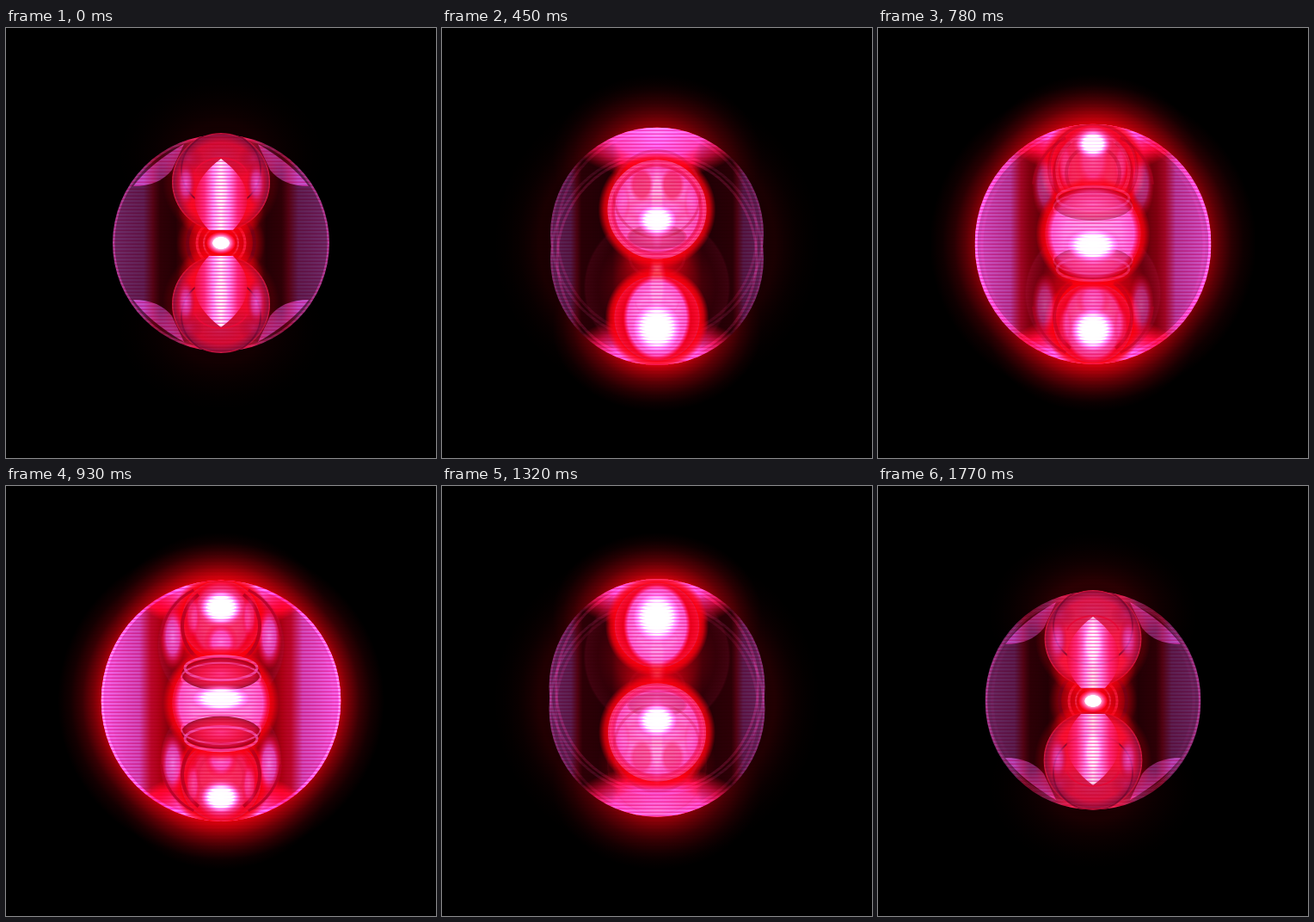
An HTML page with a canvas for the animation above (1800 ms loop, 500x500 px).

```html
<!DOCTYPE html>
<html lang="en">
<head>
<meta charset="utf-8">
<title>Glowing orbs</title>
<style>
html, body { margin: 0; width: 100%; height: 100%; overflow: hidden; background: #000; }
canvas { display: block; width: 500px; height: 500px; }
</style>
</head>
<body>
<canvas id="stage" width="500" height="500"></canvas>
<script>
const LOOP = 1800, STEP = 30;
const ctx = document.getElementById('stage').getContext('2d');

// Piecewise linear curve through the given points
function curve(xs, ys) {
  return x => {
    if (x <= xs[0]) return ys[0];
    for (let i = 1; i < xs.length; i++) {
      if (x <= xs[i]) return ys[i - 1] + (ys[i] - ys[i - 1]) * (x - xs[i - 1]) / (xs[i] - xs[i - 1]);
    }
    return ys[ys.length - 1];
  };
}

// Curves over time; the upper half uses the reversed time
const TIMES = [0, 240, 330, 660, 900, 1140, 1470, 1560, 1800];
const overTime = (...ys) => curve(TIMES, ys);
const shellRadius = overTime(126, 120, 118, 134.5, 140, 134.5, 118, 120, 126);
const shellShift = overTime(0, 17, 24, 7, 0, 2, 15, 10, 0);
const edgeLight = overTime(.42, .26, .22, .62, 1, .62, .22, .26, .42);
const edgeWidth = overTime(.22, .13, .11, .21, .25, .21, .11, .13, .22);
const sideGlow = overTime(0, 0, 0, .3, .85, .3, 0, 0, 0);
const poleGlow = overTime(.08, .85, 1, .9, .8, .7, .4, .3, .08);
const poleLight = overTime(.2, .95, 1, 1, .9, 1, .95, .9, .2);

// Curves over the orb's angle from the front, in degrees
const ANGLES = [0, 12, 30, 45, 57, 78, 90, 102, 112];
const overAngle = (...ys) => curve(ANGLES, ys);
const orb = {
  y: overAngle(0, 22, 51, 71, 84, 91, 95, 80, 74),
  r: overAngle(57, 54, 60, 57, 52, 47, 45, 57, 58),
  pink: overAngle(.85, 1, .65, .08, 1, .8, .3, .3, 0),
  coreY: overAngle(-3, -24, -4, -10, 22, 0, 16, 40, 34),
  coreW: overAngle(40, 30, 24, 12, 33, 31, 28, 18, 10),
  coreH: overAngle(16, 30, 16, 36, 31, 38, 22, 18, 10),
  core: overAngle(.9, 1, .9, .3, 1, .95, 1, .7, 0),
  alpha: overAngle(1, 1, 1, 1, 1, 1, 1, .9, 0),
  haloR: overAngle(60, 60, 60, 65, 84, 87, 73, 60, 58),
  halo: overAngle(0, 0, 0, 0, .08, .55, .75, .4, 0)
};
const near = (x, mid, span) => Math.max(0, 1 - Math.abs(x - mid) / span);
const nearStart = t => near(t, 0, 230) + near(t, LOOP, 230);
const rgba = (r, g, b, a = 1) => `rgba(${r},${g},${b},${a})`;
const red = a => rgba(255, 0, 16, a);

const GLOW_FADE = [[0, red(1)], [.4, red(.95)], [.52, red(.62)], [.65, red(.35)], [.8, red(.14)], [.9, red(.05)], [1, red(0)]];
const AURA_FADE = [[0, red(1)], [.72, red(.95)], [.78, red(.6)], [.85, red(.28)], [.92, red(.1)], [1, red(0)]];
const RED_FADE = [[0, red(1)], [.5, red(.75)], [.75, red(.35)], [1, red(0)]];
const PINK_FADE = [[0, rgba(255, 150, 255)], [.5, rgba(255, 100, 235, .85)], [.75, rgba(255, 20, 100, .6)], [1, rgba(255, 0, 30, 0)]];
const WHITE_FADE = [[0, '#fff'], [.5, rgba(255, 250, 255, .95)], [.75, rgba(255, 150, 255, .5)], [1, rgba(255, 80, 220, 0)]];

function blob(x, y, rx, ry, alpha, stops) {
  if (alpha <= 0) return;
  ctx.save();
  ctx.globalAlpha *= Math.min(1, alpha);
  ctx.translate(x, y);
  ctx.scale(rx, ry);
  const g = ctx.createRadialGradient(0, 0, 0, 0, 0, 1);
  stops.forEach(([p, c]) => g.addColorStop(p, c));
  ctx.fillStyle = g;
  ctx.beginPath();
  ctx.arc(0, 0, 1, 0, 7);
  ctx.fill();
  ctx.restore();
}

function ring(x, y, rx, ry, width, color, alpha = 1, from = 0, to = Math.PI * 2) {
  if (alpha <= 0) return;
  ctx.save();
  ctx.globalAlpha *= alpha;
  ctx.strokeStyle = color;
  ctx.lineWidth = width;
  ctx.beginPath();
  ctx.ellipse(x, y, rx, ry, 0, from, to);
  ctx.stroke();
  ctx.restore();
}

function bothSides(draw) {
  for (const side of [-1, 1]) {
    ctx.save();
    ctx.scale(side, 1);
    draw();
    ctx.restore();
  }
}

// Runs draw for the lower half, then mirrored for the upper half
function bothHalves(t, draw) {
  for (const side of [1, -1]) {
    ctx.save();
    ctx.scale(1, side);
    draw(side > 0 ? t : LOOP - t);
    ctx.restore();
  }
}

function glow(t) {
  blob(0, 0, 190, 184, sideGlow(t), AURA_FADE);
  bothHalves(t, h => blob(0, 100, 122, 96, poleGlow(h), GLOW_FADE));
}

function shellPath(t) {
  const w = shellRadius(t);
  ctx.beginPath();
  for (const y of [shellShift(t), -shellShift(LOOP - t)]) {
    ctx.moveTo(w, y);
    ctx.arc(0, y, w, 0, 7);
  }
}

function shell(t) {
  const w = shellRadius(t), e = edgeLight(t), band = edgeWidth(t), start = nearStart(t);
  ctx.save();
  shellPath(t);
  ctx.clip();
  ctx.fillStyle = '#050002';
  ctx.fillRect(-150, -150, 300, 300);
  ctx.globalCompositeOperation = 'lighter';

  const g = ctx.createLinearGradient(-w, 0, w, 0);
  const stops = [
    [0, rgba(255, 110, 245, e)],
    [band * .65, rgba(255, 90, 225, e * .85)],
    [band * .85, rgba(255, 10, 60, e * .75)],
    [band, rgba(215, 0, 25, .06 + e * e * .8)],
    [.29, rgba(170, 0, 14, .06 + e * e * .75)],
    [.36, rgba(220, 0, 14, .3 + e * .4)],
    [.5, '#e0001c']
  ];
  stops.forEach(([p, c]) => {
    g.addColorStop(p, c);
    g.addColorStop(1 - p, c);
  });
  ctx.fillStyle = g;
  ctx.fillRect(-150, -150, 300, 300);

  bothHalves(t, h => {
    const y = shellShift(h), apart = Math.min(1, y / 15);
    blob(0, y + w - 8, 104, 52, poleLight(h), PINK_FADE);
    ring(0, y, w - 1, w - 1, 3, '#d04ca8', e * .35);
    ring(0, y, w - 8, w - 5, 3, '#b03078', apart * .22);
    bothSides(() => {
      ctx.globalAlpha = start * .5;
      ctx.fillStyle = '#c45be0';
      ctx.beginPath();
      ctx.moveTo(102, 66);
      ctx.quadraticCurveTo(83, 92, 43, 115);
      ctx.lineTo(57, 85);
      ctx.quadraticCurveTo(72, 66, 102, 66);
      ctx.fill();
    });
  });
  ctx.restore();
}

function centre(t) {
  const start = nearStart(t);
  blob(0, 0, 52, 46, .9 * start, RED_FADE);
  ring(0, 0, 39, 38, 4, '#70001c', start * .7);
  ring(0, 0, 28, 27, 3, '#ff2348', start * .8);
  ring(0, 0, 20, 19, 2, '#ff588c', start * .5);
  bothHalves(t, h => {
    const neck = near(h, 285, 240);
    blob(0, 13, 42, 36, neck, RED_FADE);
    ring(0, 16, 32, 24, 3, '#d51d4b', neck * .6);
    blob(0, 14, 9, 32, neck, WHITE_FADE);
  });
}

function spindle(alpha) {
  if (alpha <= 0) return;
  ctx.save();
  ctx.globalAlpha *= alpha;
  const g = ctx.createLinearGradient(-32, 0, 32, 0);
  [[0, '#f00a30'], [.2, '#ff2f88'], [.36, '#ff9cff'], [.5, '#fff'], [.64, '#ff9cff'], [.8, '#ff2f88'], [1, '#f00a30']].forEach(s => g.addColorStop(...s));
  ctx.fillStyle = g;
  ctx.beginPath();
  ctx.moveTo(-14, 15);
  ctx.bezierCurveTo(-38, 40, -38, 70, 0, 98);
  ctx.bezierCurveTo(38, 70, 38, 40, 14, 15);
  ctx.fill();
  ctx.restore();
}

// Details that show only around certain angles; y is the orb's centre
function details(s, y, r) {
  const front = near(s, 0, 11), face = near(s, 30, 13), lens = near(s, 45, 12);
  const stem = near(s, 58, 13), side = near(s, 90, 13), back = near(s, 104, 14);

  for (const k of [-1, 1]) {
    blob(0, y + k * 34, 46, 19, front * .95, [[0, '#ff2a78'], [.5, '#f00830'], [.85, '#c40020'], [1, '#8d0018']]);
    ring(0, y + k * 30, 46, 17, 2, '#ff68c0', front * .7);
    ring(0, y + k * 41, 42, 14, 3, '#ff78e0', front * .7);
  }

  ring(0, y + 18, r - 7, r - 7, 3, '#d01848', face * .8);
  ring(0, y, r - 2, r - 2, 4, '#ff84e0', face);
  ring(0, y, r - 7, r - 7, 3, '#e0002c', face);
  blob(0, y - 32, 35, 15, face * .9, [[0, '#f0246a'], [.7, '#b00020'], [.9, '#a00020'], [1, '#ff2a62']]);
  blob(0, y, 46, 17, face * .8, PINK_FADE);
  bothSides(() => {
    blob(18, y + 29, 14, 20, face, [[0, '#e00018'], [.7, '#f00028'], [1, rgba(255, 0, 50, 0)]]);
    blob(40, y + 8, 9, 24, face * .6, PINK_FADE);
  });
  blob(0, y + 6, 10, 58, face * .85, WHITE_FADE);

  ring(0, y + 14, 46, 44, 2, '#6e0830', lens * .8);
  bothSides(() => {
    blob(41, y - 2, 11, 27, lens * .85, [[0, '#e870ee'], [.5, '#d43a9c'], [1, rgba(190, 0, 50, 0)]]);
    blob(38, y + 27, 18, 17, lens * .55, [[0, '#a92a7e'], [1, rgba(120, 0, 40, 0)]]);
  });
  spindle(lens);
  ring(0, 77, 31, 22, 2, '#e90c3c', lens, .25, Math.PI - .25);

  blob(0, y - r + 14, 12, 40, stem, WHITE_FADE);
  ring(0, y - 19, 25, 17, 2, '#ff3f9a', stem * .5, 0, Math.PI);

  bothSides(() => {
    blob(56, y - 20, 15, 38, side, PINK_FADE);
    ring(0, y - 26, 70, 68, 3, '#b50028', side * .9, .1, 1.1);
    ring(0, y - 8, 45, 46, 4, '#b20022', side * .9, -1, .95);
    blob(33, y + 4, 9, 28, side * .5, PINK_FADE);
  });
  blob(0, y - 26, 20, 24, side * .9, PINK_FADE);

  for (const k of [0, 9, 20]) ring(0, y - k * .3, r - k, r - k, 4, k === 9 ? '#ff5a9f' : '#a90022', back * .8);
  blob(0, y + 10, 22, 38, back * .9, PINK_FADE);
}

function drawOrb(angle) {
  const s = Math.abs(angle);
  const alpha = orb.alpha(s);
  if (alpha <= 0) return;
  const y = orb.y(s), r = orb.r(s), hr = orb.haloR(s);
  const lens = near(s, 45, 16);
  ctx.save();
  ctx.scale(1, angle < 0 ? -1 : 1);
  ctx.globalAlpha = alpha;

  blob(0, y - (hr - r), hr, hr, orb.halo(s), [[0, '#f00018'], [.55, rgba(225, 0, 25, .75)], [.8, rgba(130, 0, 28, .45)], [.97, rgba(165, 20, 65, .5)], [1, rgba(120, 0, 40, 0)]]);

  // Red rim, then the pink body
  blob(0, y, r + 11, r + 11, 1 - lens * .85, [[0, red(1)], [.82, red(.95)], [.9, red(.7)], [1, red(0)]]);
  blob(0, y, r, r, 1, [[0, '#fa0024'], [.8, '#ec0020'], [.96, lens > .3 ? '#8d1440' : '#f80c30'], [1, '#e81c48']]);
  blob(0, y - 32, 50, 38, lens * .9, [[0, '#ff1030'], [.6, red(.85)], [1, red(0)]]);
  blob(0, y + 30, r - 6, 30, lens * .5, [[0, '#a22465'], [1, rgba(90, 0, 35, 0)]]);
  const bodyW = s > 66 ? r * .8 : r;
  blob(0, y, bodyW, r, orb.pink(s), [[0, '#ffc4ff'], [.6, '#ffa0ff'], [.86, '#ff70e8'], [.94, rgba(255, 35, 115, .9)], [1, rgba(255, 0, 30, .2)]]);
  details(s, y, r);
  blob(0, y + orb.coreY(s), orb.coreW(s), orb.coreH(s), orb.core(s), WHITE_FADE);
  ctx.restore();
}

// Keeps the orbs and their rims inside the shell
function orbs(t, angles) {
  ctx.save();
  shellPath(t);
  for (const a of angles) {
    const s = Math.abs(a), y = orb.y(s) * Math.sign(a);
    if (s > 100) continue;
    ctx.moveTo(orb.r(s), y);
    ctx.arc(0, y, orb.r(s), 0, 7);
  }
  ctx.clip();
  angles.forEach(drawOrb);
  ctx.restore();
}

function makeScanlines() {
  const tile = document.createElement('canvas');
  tile.width = 1;
  tile.height = 4;
  const c = tile.getContext('2d');
  ['#fff', '#fff', '#fcb8ec', '#f478bc'].forEach((color, i) => {
    c.fillStyle = color;
    c.fillRect(0, i, 1, 1);
  });
  return ctx.createPattern(tile, 'repeat');
}
const scanlines = makeScanlines();

function render(t) {
  ctx.setTransform(1, 0, 0, 1, 0, 0);
  ctx.globalCompositeOperation = 'source-over';
  ctx.globalAlpha = 1;
  ctx.fillStyle = '#000';
  ctx.fillRect(0, 0, 500, 500);
  ctx.translate(250, 250);

  glow(t);
  shell(t);
  centre(t);

  // Four orbs on one orbit, a quarter turn per loop
  const turn = 90 * (t / LOOP - .5);
  const angles = [0, 90, 180, -90].map(a => (turn + a + 540) % 360 - 180);
  angles.sort((a, b) => Math.abs(b) - Math.abs(a));
  orbs(t, angles);

  ctx.setTransform(1, 0, 0, 1, 0, 0);
  ctx.globalCompositeOperation = 'multiply';
  ctx.fillStyle = scanlines;
  ctx.fillRect(0, 0, 500, 500);

  // Hot centres burn through the lines
  ctx.globalCompositeOperation = 'lighter';
  ctx.translate(250, 250);
  for (const a of angles) {
    const s = Math.abs(a), y = (orb.y(s) + orb.coreY(s)) * (a < 0 ? -1 : 1);
    blob(0, y, orb.coreW(s) * .85, orb.coreH(s) * .8, (orb.core(s) - .3) * .85, WHITE_FADE);
  }
  const start = nearStart(t);
  blob(0, 0, 17, 13, start, WHITE_FADE);
  blob(0, 0, 10, 7, start, [[0, '#fff'], [.8, '#fff'], [1, rgba(255, 255, 255, 0)]]);
}

function frame() {
  const t = performance.now() % LOOP;
  render(Math.floor(t / STEP) * STEP);
  requestAnimationFrame(frame);
}
frame();
</script>
</body>
</html>
```
